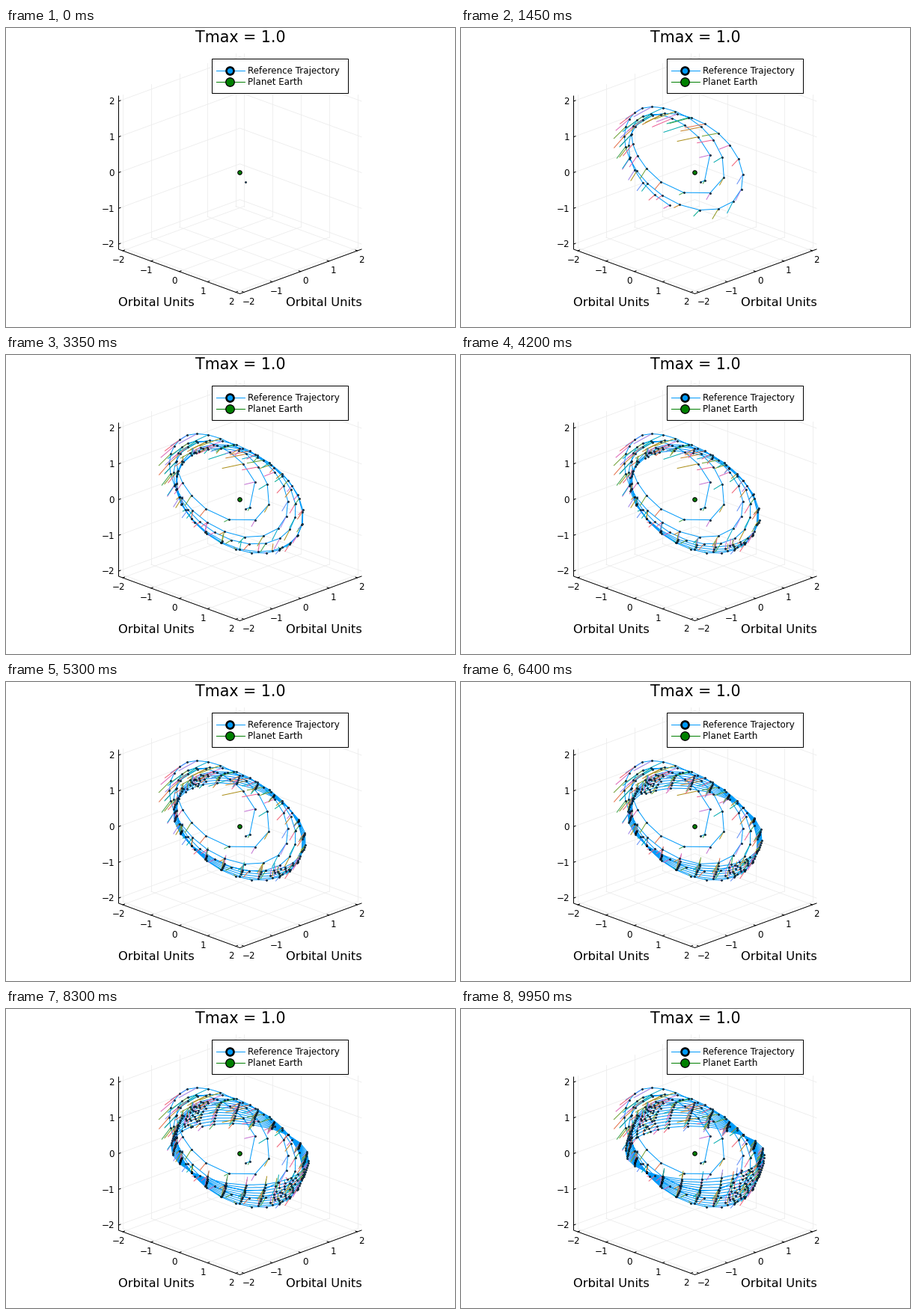
Recreate the animation shown at these times as a matplotlib script. Size 600x400 px, loop 10 s.

```python
import numpy as np
import matplotlib.pyplot as plt
from matplotlib.animation import FuncAnimation
from matplotlib.collections import LineCollection
from matplotlib.patches import Rectangle

W, H, DPI = 600, 400, 100
PX = 72 / DPI  # one pixel in points
FRAMES, STEP_MS = 200, 50

BLUE, GREEN = "#009afa", "#008000"
PALETTE = ["#e36f47", "#3ea44e", "#c371d2", "#ac8e18", "#00aaae", "#ed5e93",
           "#c68225", "#00a98d", "#8e971e", "#00a9cc", "#9b7fe9", "#618df6",
           "#f05f73", "#dd64b5", "#6c9f33"]

CENTER = np.array([312.3, 193.3])
LIM = 2.145
LEFT, FRONT = np.array([150.5, 296]), np.array([312.5, 355.5])
RIGHT, BACK = np.array([475, 296]), np.array([312.5, 236.5])
UP = np.array([0, -205])

# Orbit: a conic whose size grows and eccentricity fades with the swept angle
KEY_DEG = [-62, 180, 350, 450, 600, 900, 1260]
KEY_SIZE = [0.3, 0.6, 0.58, 0.8, 0.86, 0.92, 1]
KEY_ECC = [0.62, 0.55, 0.4, 0.38, 0.25, 0.17, 0]
START_DEG, FLIP_DEG, APOGEE_DEG = -97, 1520, 95
FIRST_FLIP, LAST = 98, 380
HEAD = 0.88  # the first step is shorter than the others by this much
NODE = np.array([66, -24])
CLUSTER = 4  # points crowded together at each thrust flip

rng = np.random.default_rng(4)
idx = np.arange(LAST + 1)


def conic(deg):
    size = np.interp(deg, KEY_DEG, KEY_SIZE)
    ecc = np.interp(deg, KEY_DEG, KEY_ECC)
    return size, size / (1 - ecc * np.cos(np.radians(deg - APOGEE_DEG)))


def swept_angles():
    # Equal areas in equal times until the thrust starts to flip
    deg = np.linspace(START_DEG, FLIP_DEG, 5000)
    size, r = conic(deg)
    clock = np.cumsum(r**2 / np.sqrt(size))
    clock *= (FIRST_FLIP - HEAD) / clock[-1]
    opening = np.interp(np.maximum(0, idx[:FIRST_FLIP] - HEAD), clock, deg)

    # Then every half turn: a cluster at the flip, evenly spread points after
    half_turn = np.r_[np.linspace(0, 21, CLUSTER), 35 + 16.6 * np.arange(9)]
    half, j = np.divmod(idx[FIRST_FLIP:] - FIRST_FLIP, len(half_turn))
    jitter = np.where(j < CLUSTER, rng.uniform(-3, 3, len(j)), 0)
    return np.r_[opening, FLIP_DEG + 180 * half + half_turn[j] + jitter]


def trajectory(deg):
    a = np.radians(deg)[:, None]
    u = np.maximum(-0.05, (idx / 2 - 53) / 126)
    antinode = -np.c_[53 + 19 * u - 7 * u**2, 66.3 - 30.8 * u - 8 * u**2]
    r = conic(deg)[1][:, None]
    return CENTER + r * (NODE * np.cos(a) + antinode * np.sin(a))


def thrust(deg, pts):
    dx, dy = (pts - CENTER).T
    ang = np.arctan2(-dy, dx)
    top = np.maximum(0, np.cos(ang - np.radians(95)))
    raising = np.c_[-8 - 21 * top**2, 10 + 6 * np.cos(2 * (ang - np.radians(150)))]
    raising *= np.minimum(1, 1.6 * conic(deg)[1])[:, None]
    side = np.tanh(8 * np.cos(np.radians(deg)))
    tilting = np.c_[-2 - 4 * side, 9 * side - 2]
    mix = np.clip((idx - 58) / 50, 0, 1)[:, None]
    return raising * (1 - mix) + tilting * mix


angles = swept_angles()
points = trajectory(angles)
arrows = np.stack([points, points + thrust(angles, points)], axis=1)
colors = [PALETTE[i % len(PALETTE)] for i in idx]

fig = plt.figure(figsize=(W / DPI, H / DPI), dpi=DPI, facecolor="white")
ax = fig.add_axes([0, 0, 1, 1])
ax.set_xlim(0, W)
ax.set_ylim(H, 0)
ax.axis("off")


def stroke(pts, color="black", width=1.0, z=1):
    xs, ys = zip(*pts)
    return ax.plot(xs, ys, color=color, lw=width * PX, zorder=z)[0]


def dots(xs, ys, size, fill, edge, z):
    mark, = ax.plot(xs, ys, "o", ms=size * PX, mfc=fill, mec="black",
                    mew=edge * PX, zorder=z)
    mark.set_snap(False)
    return mark


def label(x, y, s, size, ha="center", z=5):
    ax.text(x, y, s, fontsize=size * PX, ha=ha, va="baseline",
            family="DejaVu Sans", zorder=z)


def along(a, b, v):
    return a + (b - a) * (v + LIM) / (2 * LIM)


def draw_axes():
    grid = dict(color="#ececec", width=0.8, z=0)
    for v in range(-2, 3):
        text = str(v).replace("-", "\u2212")
        lf, fr = along(LEFT, FRONT, v), along(FRONT, RIGHT, v)
        lb, br = along(LEFT, BACK, v), along(BACK, RIGHT, v)
        rise = UP * (v + LIM) / (2 * LIM)
        stroke([lf, br], **grid)
        stroke([fr, lb], **grid)
        stroke([lb, lb + UP], **grid)
        stroke([br, br + UP], **grid)
        stroke([LEFT + rise, BACK + rise, RIGHT + rise], **grid)
        stroke([lf, lf + (2.5, -1)])
        stroke([fr, fr + (-2.5, -1)])
        stroke([LEFT + rise, LEFT + rise + (2.5, -1)])
        label(225.5 + 37.7 * v, 342.3 + 14 * v, text, 11.85)
        label(399.7 + 37.7 * v, 342.3 - 14 * v, text, 11.85)
        label(145, 197.8 - 47.7 * v, text, 11.85, ha="right")
    stroke([LEFT + UP, LEFT, FRONT, RIGHT])
    label(200.5, 371.5, "Orbital Units", 16.3)
    label(424.5, 371.5, "Orbital Units", 16.3)
    label(313.3, 18.8, "Tmax = 1.0", 20.7)


def draw_legend():
    ax.add_patch(Rectangle((274.5, 41), 182, 45.5, fc="white", ec="black",
                           lw=PX, zorder=6))
    rows = [(56.5, BLUE, 10, 2.6, "Reference Trajectory"),
            (71.5, GREEN, 11.5, 1.3, "Planet Earth")]
    for y, color, size, edge, text in rows:
        stroke([(281, y), (318.5, y)], color, z=7)
        dots([299.3], [y], size, color, edge, 8)
        label(322.7, y + 4.4, text, 11.85, ha="left", z=8)


draw_axes()
draw_legend()
dots(CENTER[:1], CENTER[1:], 5.5, GREEN, 1.1, 4)

path = stroke([points[0]], BLUE, z=2)
burns = LineCollection([], linewidths=PX, zorder=3)
ax.add_collection(burns, autolim=False)
marks = dots([], [], 1.8, BLUE, 0.9, 3.5)


def update(frame):
    n = min(2 * frame, LAST) + 1
    xs, ys = points[:n].T
    path.set_data(xs, ys)
    marks.set_data(xs, ys)
    burns.set_segments(arrows[1:n])
    burns.set_color(colors[1:n] or "none")
    return path, burns, marks


anim = FuncAnimation(fig, update, frames=FRAMES, interval=STEP_MS,
                     init_func=lambda: update(0), repeat=True, repeat_delay=0)
plt.show()
```
